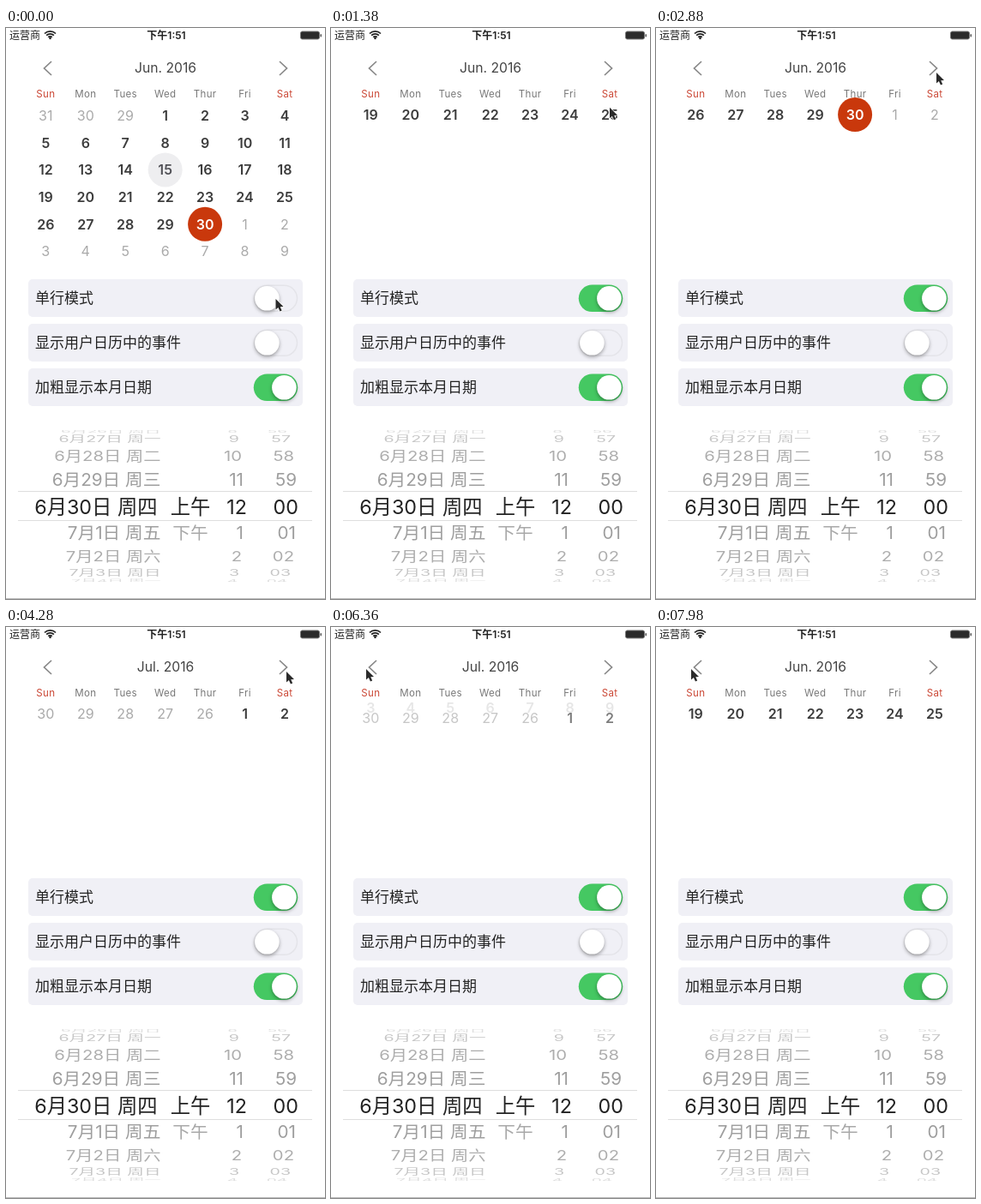
Write an HTML page with a canvas that moves like this. It is 372x666 px and loops after 8000 ms.

```html
<!DOCTYPE html>
<html lang="zh">
<head>
<meta charset="utf-8">
<style>
  html, body { margin: 0; width: 372px; height: 666px; overflow: hidden; background: #fff; }
  canvas { display: block; }
</style>
</head>
<body>
<canvas id="stage" width="372" height="666"></canvas>
<script>
const ctx = document.getElementById('stage').getContext('2d');
const LOOP = 8000;
const FONT = 'Inter, "Noto Sans CJK SC", "Noto Sans CJK", sans-serif';
const RED = '#c9380c';
const PANEL = '#f0f0f6';

const MONTHS = {
  Jun: { lead: 3, days: 30, previous: 31, today: 15, selected: 30 },
  Jul: { lead: 5, days: 31, previous: 30 }
};
const COLLAPSE = 200;
// start time, month, week row
const WEEKS = [
  [COLLAPSE, 'Jun', 3], [2000, 'Jun', 4], [3300, 'Jul', 0], [4450, 'Jul', 1],
  [6180, 'Jul', 0], [6950, 'Jun', 4], [7600, 'Jun', 3]
];
const CURSOR = [
  [0, 314.5, 316], [600, 314.5, 316], [1380, 325, 93], [1560, 327, 52],
  [4800, 327, 52], [5060, 155, 54], [5350, 41, 49], [LOOP, 41, 49]
];

const clamp = x => Math.max(0, Math.min(1, x));
const mix = (a, b, p) => a + (b - a) * p;
const smooth = x => { x = clamp(x); return x * x * (3 - 2 * x); };

function text(s, x, y, size, color, { align = 'center', weight = 400, spacing = 0, squeeze = 1 } = {}) {
  ctx.save();
  ctx.translate(x, y);
  ctx.scale(1, squeeze);
  ctx.font = `${weight} ${size}px ${FONT}`;
  ctx.letterSpacing = spacing + 'px';
  ctx.textAlign = align;
  ctx.fillStyle = color;
  ctx.fillText(s, 0, size * .365);
  ctx.restore();
}

function circle(x, y, r, color) {
  ctx.fillStyle = color;
  ctx.beginPath();
  ctx.arc(x, y, r, 0, 7);
  ctx.fill();
}

function box(x, y, w, h, r, fill, stroke) {
  ctx.beginPath();
  ctx.roundRect(x, y, w, h, r);
  ctx.fillStyle = fill;
  ctx.fill();
  if (stroke) { ctx.strokeStyle = stroke; ctx.stroke(); }
}

function line(points, color, width) {
  ctx.beginPath();
  points.forEach(p => ctx.lineTo(...p));
  ctx.strokeStyle = color;
  ctx.lineWidth = width;
  ctx.stroke();
}

function statusBar() {
  text('运营商', 4, 8.5, 12, '#222', { align: 'left' });
  text('下午1:51', 187, 8.5, 12, '#222', { weight: 600 });
  ctx.strokeStyle = '#222';
  ctx.lineWidth = 1.7;
  for (const r of [4, 7, 10]) {
    ctx.beginPath();
    ctx.arc(51.5, 13, r - .8, -Math.PI * .75, -Math.PI * .25);
    ctx.stroke();
  }
  circle(51.5, 12, 1.3, '#222');
  ctx.lineWidth = 1;
  box(343.5, 4, 22, 9, 2, '#2b2b2b', '#777');
  box(366.5, 7, 1.5, 3.5, 1, '#555');
}

function header(month) {
  text(month + '. 2016', 186, 46.5, 15.7, '#444');
  line([[53, 39], [44.5, 47], [53, 55]], '#888', 1.7);
  line([[319, 39], [327.5, 47], [319, 55]], '#888', 1.7);
  ['Sun', 'Mon', 'Tues', 'Wed', 'Thur', 'Fri', 'Sat'].forEach((d, i) =>
    text(d, 46.3 + 46.45 * i, 76.5, 11.5, i % 6 ? '#777' : '#cb4836', { spacing: .3 }));
}

function week(name, row, y, alpha) {
  if (alpha <= 0) return;
  const m = MONTHS[name];
  ctx.globalAlpha = alpha;
  for (let i = 0; i < 7; i++) {
    const x = 46.3 + 46.45 * i, index = row * 7 + i, n = index - m.lead + 1;
    const inside = n >= 1 && n <= m.days;
    const day = n < 1 ? m.previous - index : inside ? n : n - m.days;
    let color = inside ? '#3c3c3c' : '#aaa';
    if (inside && n === m.today) { circle(x, y, 20, '#eeeef0'); color = '#505056'; }
    if (inside && n === m.selected) { circle(x, y, 20, RED); color = '#fff'; }
    text(day, x, y, 16, color, { weight: inside ? 600 : 400 });
  }
  ctx.globalAlpha = 1;
}

function calendar(t) {
  const current = WEEKS.findLastIndex(w => t >= w[0]);
  header(current < 0 ? 'Jun' : WEEKS[current][1]);
  if (current <= 0) {
    const p = smooth((t - COLLAPSE) / 350);
    for (let r = 0; r < 6; r++) {
      const y = 102 + 31.7 * r;
      if (r === WEEKS[0][2]) week('Jun', r, mix(y, 101, p), 1);
      else week('Jun', r, y, 1 - clamp(p * 1.6));
    }
    return;
  }
  const [start, name, row] = WEEKS[current], [, oldName, oldRow] = WEEKS[current - 1];
  const p = clamp((t - start) / 300);
  week(oldName, oldRow, 101 - 12 * p, (1 - p) ** 2.2);
  week(name, row, 101 + 12 * (1 - p), p ** .8);
}

function option(label, y, on) {
  box(26, y - 22, 320, 44, 5, PANEL);
  text(label, 34, y, 17, '#222', { align: 'left' });
  ctx.lineWidth = 1.5;
  box(289.5, y - 14.7, 50, 30, 15, PANEL, '#e4e4e9');
  ctx.globalAlpha = on;
  box(288.8, y - 15.4, 51.4, 31.4, 15.7, '#45c862');
  ctx.globalAlpha = 1;
  ctx.save();
  ctx.shadowColor = 'rgba(0,0,0,.35)';
  ctx.shadowBlur = 4;
  ctx.shadowOffsetY = 2;
  circle(mix(304.4, 324.4, on), y + .3, 14.3, '#fff');
  ctx.restore();
}

function picker() {
  // y, size, vertical squeeze, colour, date, hour, minute, right edges of the hour and minute columns
  const rows = [
    [470, 19, .28, '#dedede', '6月26日 周日', '8', '56', 270, 328],
    [479.5, 19.6, .5, '#c6c6c6', '6月27日 周一', '9', '57', 272, 332],
    [499, 20.3, .8, '#adadad', '6月28日 周二', '10', '58', 275, 336],
    [526.5, 20.7, .96, '#9e9e9e', '6月29日 周三', '11', '59', 277, 339],
    [558, 23.3, 1, '#222', '6月30日 周四', '12', '00', 281, 341],
    [589, 20.7, .96, '#9e9e9e', '7月1日 周五', '1', '01', 277, 338],
    [616, 20.3, .8, '#adadad', '7月2日 周六', '2', '02', 275, 336],
    [635, 19.6, .5, '#c6c6c6', '7月3日 周日', '3', '03', 272, 332],
    [645, 19, .28, '#dedede', '7月4日 周一', '4', '04', 270, 328]
  ];
  ctx.save();
  ctx.beginPath();
  ctx.rect(0, 469, 372, 177);
  ctx.clip();
  for (const [y, size, squeeze, color, date, hour, minute, hourX, minuteX] of rows) {
    const style = { align: 'right', squeeze };
    text(date, y === 558 ? 176.5 : 180.5, y, size, color, style);
    text(hour, hourX, y, size, color, style);
    text(minute, minuteX, y, size, color, style);
  }
  ctx.restore();
  text('上午', 215, 558, 23.3, '#222');
  text('下午', 215, 589, 20.7, '#a8a8a8', { squeeze: .96 });
  for (const y of [540.5, 574.5]) line([[14, y], [357, y]], '#dedede', 1);
  line([[0, 665.5], [372, 665.5]], '#bbb', 1);
}

function cursor(t) {
  const i = CURSOR.findLastIndex(k => t >= k[0]);
  const [t0, x0, y0] = CURSOR[i], [t1, x1, y1] = CURSOR[i + 1];
  const p = (t - t0) / (t1 - t0);
  ctx.save();
  ctx.translate(mix(x0, x1, p), mix(y0, y1, p));
  ctx.scale(.9, .9);
  ctx.beginPath();
  [[0, 0], [0, 14], [3.2, 11.2], [5.5, 16.2], [8, 15.1], [5.8, 10.2], [10, 10]]
    .forEach(q => ctx.lineTo(...q));
  ctx.closePath();
  ctx.lineWidth = 1.6;
  ctx.lineJoin = 'round';
  ctx.strokeStyle = '#fff';
  ctx.stroke();
  ctx.fillStyle = '#2a2a2a';
  ctx.fill();
  ctx.restore();
}

function draw() {
  const t = performance.now() % LOOP;
  ctx.fillStyle = '#fff';
  ctx.fillRect(0, 0, 372, 666);
  statusBar();
  calendar(t);
  option('单行模式', 315, smooth((t - COLLAPSE) / 250));
  option('显示用户日历中的事件', 367, 0);
  option('加粗显示本月日期', 419, 1);
  picker();
  cursor(t);
  requestAnimationFrame(draw);
}
draw();
</script>
</body>
</html>
```
